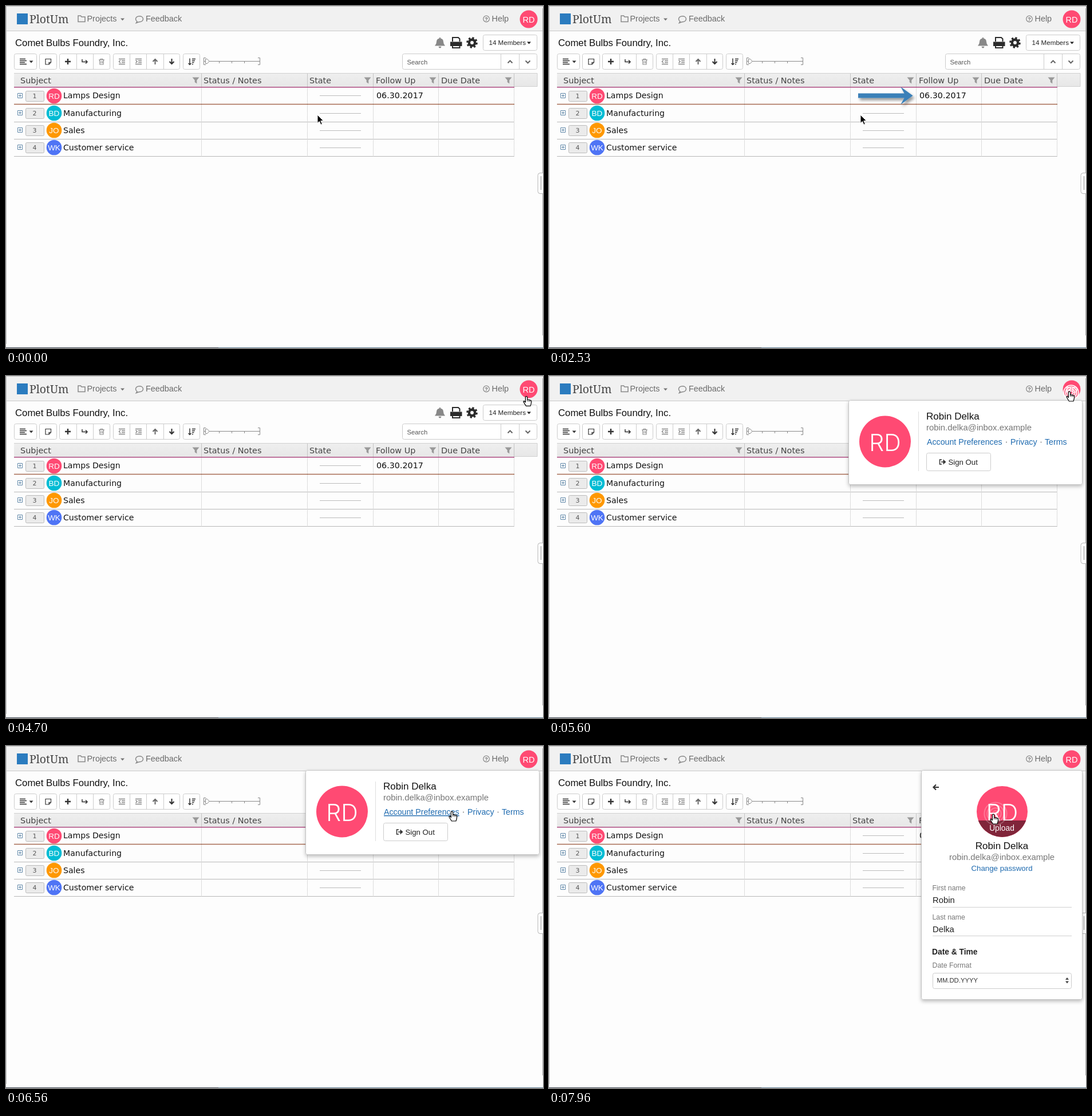
These frames come from a looping animation (938 by 597 pixels, 8000 ms). An HTML page:

```html
<!DOCTYPE html>
<html lang="en">
<head>
<meta charset="utf-8">
<title>Project grid</title>
<style>
  html, body { margin: 0; height: 100%; overflow: hidden; background: #fdfdfd; }
  svg { display: block; width: 100vw; height: 100vh; }
  text { font-family: "Liberation Sans", Arial, sans-serif; white-space: pre; }
  .grid text { font-family: "DejaVu Sans", Verdana, sans-serif; font-size: 14.1px; }
  .grid .initials, .initials { font-family: "Liberation Sans", Arial, sans-serif; fill: #fff; text-anchor: middle; }
  .big { font-family: Inter, sans-serif; font-weight: 300; font-size: 41px; }
  .nav text { font-size: 14.4px; fill: #6b6b6b; }
  .button { fill: #fff; stroke: #ccc; }
  .line { fill: none; stroke: #333; stroke-width: 1.5; }
  .dim { stroke: #888; }
  .link { fill: #1f6bb0; font-size: 14.2px; }
  .name { font-size: 17px; fill: #111; }
  .mail { font-size: 14.9px; fill: #777; }
  .label { font-size: 12.3px; fill: #777; }
  .value { font-size: 14.8px; fill: #222; }
  .card { fill: #fff; stroke: #c4c4c4; filter: url(#cardShadow); }
  .middle { text-anchor: middle; }
</style>
</head>
<body>
<svg viewBox="0 0 938 597" preserveAspectRatio="none">
  <defs>
    <filter id="cardShadow" x="-10%" y="-10%" width="120%" height="125%">
      <feDropShadow dx="0" dy="3" stdDeviation="3" flood-opacity=".25"/>
    </filter>
    <filter id="arrowShadow" x="-20%" y="-30%" width="140%" height="180%">
      <feDropShadow dx="3" dy="4" stdDeviation="2.5" flood-opacity=".4"/>
    </filter>
    <linearGradient id="headFill" x2="0" y2="1">
      <stop stop-color="#efefef"/><stop offset="1" stop-color="#e7e7e7"/>
    </linearGradient>
    <clipPath id="uploadClip"><path d="M740 130h104v40h-104z"/></clipPath>
    <path id="funnel" d="M-6-5H6L1.8 0V6L-1.8 3.5V0Z" fill="#999"/>
    <path id="caret" d="M-3.5-2h7L0 2z"/>
  </defs>

  <rect width="938" height="597" fill="#fdfdfd"/>

  <!-- navigation bar -->
  <g class="nav">
    <rect width="938" height="43" fill="#f1f1f1"/>
    <path d="M0 43.5H938" stroke="#c8c8c8"/>
    <rect x="19" y="13" width="19" height="19" fill="#2b7cbf"/>
    <text x="41" y="29.5" style="font:19.5px 'Noto Serif',serif;fill:#444">PlotUm</text>
    <path class="line dim" stroke-width="1.2" d="M126 27.500V17h4.500l1.500 2h6v8.500z"/>
    <text x="141.500" y="27">Projects</text>
    <use href="#caret" x="203.500" y="23.500" fill="#777"/>
    <path class="line dim" d="M229 27l-1.500 2.500 5-1.800c4 .3 7-1.800 7-5s-3-5-6.500-5-6.500 2-6.500 5c0 2 1 3.300 2.500 4.300z"/>
    <text x="244" y="27">Feedback</text>
    <circle class="line dim" cx="839" cy="22.500" r="5.300" style="stroke-width:1.200"/>
    <text class="middle" x="839" y="26" style="font-size:9px;font-weight:bold">?</text>
    <text x="848.500" y="27">Help</text>
    <circle cx="913" cy="23" r="15.500" fill="#ff4a73"/>
    <text class="initials" x="913" y="28.500" style="fill:#fff;font-size:14.500px">RD</text>
  </g>

  <!-- title row -->
  <text x="16" y="69.500" font-size="16.750" fill="#111">Comet Bulbs Foundry, Inc.</text>
  <path d="M749 69.500q3-3 3-7 0-5 5-6v-1.500h2v1.500q5 1 5 6 0 4 3 7zm6.500 1.300h5q-.5 2.700-2.500 2.700t-2.500-2.700z" fill="#888"/>
  <g fill="none" stroke="#2b2b2b" stroke-width="2">
    <path d="M780 62v-7h10l2.500 2.500V62M780 67v6h12.500v-6"/>
    <path d="M777 69v-5.500h18.500V69z" fill="#2b2b2b"/>
    <circle cx="814" cy="64" r="5.200" stroke-width="4.500"/>
    <circle cx="814" cy="64" r="8.300" stroke-width="3" stroke-dasharray="3.300 3.220"/>
  </g>
  <rect id="members" class="button" x="833.500" y="50.500" width="94" height="27" rx="3"/>
  <text x="843.500" y="68" font-size="11.600" fill="#222">14 Members</text>
  <use href="#caret" x="913.500" y="64.500" fill="#222"/>

  <!-- toolbar -->
  <g id="toolbar"></g>
  <path class="line" d="M24 92.500h10M24 95.500h12M24 98.500h9M24 101.500h12"/>
  <use href="#caret" x="44" y="97.500" fill="#333"/>
  <path class="line" d="M69 92.500h9.500v6l-3.500 3.500h-6zM78.500 98.500h-3.500v3.500" style="stroke-width:1.200"/>
  <path class="line" d="M108 92v10M103 97h10" style="stroke-width:2.400"/>
  <path class="line" d="M133 93v4.500h9M139 94.500l3 3-3 3"/>
  <path class="line dim" d="M163.500 94.500l.5 7.500h6l.5-7.500M162 94h10M165 94v-1.500h4V94M166 96v4M168.500 96v4" style="stroke-width:1.100"/>
  <path class="line dim" d="M197 92.500h11M202 95.500h6M202 98.500h6M197 101.500h11M200 94.500l-2.500 2.500 2.500 2.500"/>
  <path class="line dim" d="M226 92.500h11M231 95.500h6M231 98.500h6M226 101.500h11M226.500 94.500l2.500 2.500-2.500 2.500"/>
  <path class="line" d="M260.500 102v-9M256.500 97l4-4 4 4" style="stroke:#666;stroke-width:2"/>
  <path class="line" d="M289.500 92v9M285.500 97l4 4 4-4" style="stroke-width:2"/>
  <path class="line" d="M321 91.500v11M318.500 100l2.500 2.500 2.500-2.500M325 92.500h6M325 95.500h5M325 98.500h3.500M325 101.500h2"/>
  <path class="line dim" d="M349 90.500h-3.500v12h3.500M440 90.500h3.500v12H440M346 96.500h97M372.500 97v3M394.500 97v3M416.500 97v3" style="stroke-width:1"/>
  <path class="line dim" d="M348.500 92.500h3l3.500 4-3.500 4h-3z" style="fill:#fff;stroke-width:1"/>
  <text x="700.500" y="101.500" font-size="11.300" fill="#555">Search</text>
  <path class="line" d="M876.500 99.500l4-4 4 4M907.500 95.500l4 4 4-4" style="stroke:#666;stroke-width:2"/>

  <!-- grid -->
  <g class="grid" id="grid">
    <rect x="14" y="117" width="914" height="24" fill="url(#headFill)"/>
    <path d="M14 117.500H928V140.500H888" fill="none" stroke="#d0d0d0"/>
  </g>

  <!-- side handle and window edges -->
  <path d="M937.500 4V575" stroke="#aaa"/>
  <path d="M938 291.500h-5q-4 0-4 4v28q0 4 4 4h5" fill="#fff" stroke="#b5b5b5"/>
  <path d="M934.500 297v24" stroke="#888"/>
  <path d="M.5 590V.5H938" fill="none" stroke="#c4c4c4"/>
  <path d="M0 596.500H371" stroke="#3c4650"/>
  <path d="M371 596.500H938" stroke="#5d7b90"/>

  <path id="pointer" d="M540 152.500H621L614.500 141 636 156.500 614.500 172 621 160.500H540Z" fill="#3a80b8" filter="url(#arrowShadow)"/>

  <!-- account popover -->
  <g id="popover">
    <rect class="card" x="523.500" y="42.500" width="408" height="147" rx="3"/>
    <circle cx="587" cy="114.500" r="45" fill="#ff4a73"/>
    <text class="initials big" x="587" y="130.500">RD</text>
    <path d="M645.500 62V166" stroke="#ddd"/>
    <text class="name" x="659" y="76">Robin Delka</text>
    <text class="mail" x="659" y="95">robin.delka@inbox.example</text>
    <text class="link" id="preferences" x="660" y="120">Account Preferences</text>
    <text class="link" x="806" y="120">Privacy</text>
    <text class="link" x="866" y="120">Terms</text>
    <path d="M798 115.500h2M858.500 115.500h2" stroke="#888" stroke-width="1.500"/>
    <rect class="button" x="659.500" y="134.500" width="112" height="31" rx="3"/>
    <path class="line" d="M686 146h-3.500v8h3.500M685 150h5"/>
    <path d="M688.500 145.500l5 4.500-5 4.500z" fill="#333"/>
    <text x="697.500" y="154.500" font-size="13.200" fill="#222">Sign Out</text>
  </g>

  <!-- preferences panel -->
  <g id="panel">
    <rect class="card" x="650.500" y="42.500" width="281" height="400" rx="3"/>
    <path class="line" d="M681 72h-9M676 67.500l-4.500 4.500 4.500 4.500" style="stroke-width:2.200"/>
    <circle cx="791.500" cy="114.500" r="44.500" fill="#ff4a73"/>
    <text class="initials big" x="791.500" y="130.500">RD</text>
    <circle cx="791.500" cy="114.500" r="44.500" fill="#80253a" clip-path="url(#uploadClip)"/>
    <text class="initials" x="791" y="147.500" font-size="13.800">Upload</text>
    <text class="name middle" x="791" y="179.500">Robin Delka</text>
    <text class="mail middle" x="791" y="199">robin.delka@inbox.example</text>
    <text class="link middle" x="791" y="217.500" style="font-size:13.300px">Change password</text>
    <text class="label" x="669.500" y="251.500">First name</text>
    <text class="value" x="670" y="274">Robin</text>
    <text class="label" x="669.500" y="302.500">Last name</text>
    <text class="value" x="670" y="325">Delka</text>
    <path d="M670 281.500H913M670 331.500H913" stroke="#d0d0d0"/>
    <text x="669" y="363.500" font-size="13.800" font-weight="bold" fill="#222">Date &amp; Time</text>
    <text class="label" x="669.500" y="387">Date Format</text>
    <rect class="button" x="670.500" y="396.500" width="242" height="27" rx="3"/>
    <text x="677.500" y="413" font-size="11.300" fill="#333">MM.DD.YYYY</text>
    <path d="M902 408l3-4 3 4zM902 410.500l3 4 3-4z" fill="#444"/>
  </g>

  <g id="ripple" fill="none" stroke="#fff" stroke-width="2"></g>

  <path id="arrowCursor" d="M0 0V14.500L3.400 11.400 6 17.200 8.400 16.200 5.800 10.500H10.500Z" fill="#000" stroke="#fff"/>
  <g id="handCursor" fill="#fff" stroke="#000" stroke-width="1.200" stroke-linejoin="round">
    <path d="M-1.600 10.500V1.800q0-1.600 1.500-1.600t1.700 1.600V6q1-1 2.500.5 1.200-.8 2.400.5 2-.4 2.300 1.700l-.6 4.300-1.200 4H-.6L-4.800 10.200q-.8-2 1-1.900z"/>
    <path d="M1.600 6v3M4.200 7v2.500M6.600 7.500v2" stroke-width=".9"/>
  </g>
</svg>

<script>
const $ = id => document.getElementById(id);
const LOOP = 8000;

// Button groups: left edge, inner dividers, right edge
$('toolbar').innerHTML = [[14, 53], [58, 88], [93, 123, 152, 181], [187, 216, 245, 275, 303],
  [309, 338], [692, 864, 896, 927]].map(edges => {
    const left = edges[0], right = edges.at(-1);
    return `<rect class="button" x="${left + .5}" y="83.5" width="${right - left}" height="27" rx="3"/>` +
      edges.slice(1, -1).map(x => `<path d="M${x + .5} 84V110" stroke="#ccc"/>`).join('');
  }).join('');

const columns = [['Subject', 25, 341], ['Status / Notes', 345, 526], ['State', 530, 641],
  ['Follow Up', 646, 755], ['Due Date', 760, 887]];
const rows = [['RD', '#ff4a73', 'Lamps Design'], ['BD', '#00bcd4', 'Manufacturing'],
  ['JO', '#ff9800', 'Sales'], ['WK', '#4f74f5', 'Customer service']];

const header = columns.map(([title, x, right]) =>
  `<text x="${x}" y="134.5" fill="#444" style="font-size:14.4px">${title}</text>
   <path d="M${right + .5} 118V141" stroke="#c4c4c4"/>
   <path d="M${right + .5} 142V262" stroke="#bbb" stroke-dasharray="1 1"/>` +
  (title[1] === 't' && title.length > 5 ? '' : `<use href="#funnel" x="${right - 9.5}" y="129.5"/>`)).join('');

const body = rows.map(([initials, color, title], i) => {
  const y = 157 + 30 * i;
  return `<path d="M20.5 ${y - 4.5}h8v8h-8zM22 ${y - .5}h5M24.500 ${y - 3}v5" fill="none" stroke="#5f87a8"/>
    <rect x="34.5" y="${y - 8.500}" width="32" height="18" rx="2" fill="#ebebeb" stroke="#bbb"/>
    <text class="middle" x="50" y="${y + 4}" fill="#555" style="font-size:11px">${i + 1}</text>
    <circle cx="84" cy="${y}" r="13.3" fill="${color}"/>
    <text class="initials" x="84" y="${y + 5}" style="font-size:13.5px">${initials}</text>
    <text x="100" y="${y + (i ? 5 : 4)}" fill="#111">${title}</text>
    <path d="M548 ${y + (i ? .5 : -.5)}H620" stroke="#bbb"/>
    ${i ? `<path d="M14 ${y + 15.5}H888" stroke="#b8b8b8"/>` : ''}`;
}).join('');

$('grid').innerHTML += header + body +
  `<text x="647" y="161" fill="#111" style="font-size:14.3px">06.30.2017</text>
   <path d="M14 141.700H888" stroke="#ad4a80" stroke-width="1.500"/>
   <path d="M14 171.500H888" stroke="#a5694f" stroke-width="1.500"/>`;

const RINGS = 4;
$('ripple').innerHTML = '<circle/>'.repeat(RINGS);

const ease = (t, start, end) => {
  const p = Math.min(1, Math.max(0, (t - start) / (end - start)));
  return (1 - Math.cos(Math.PI * p)) / 2;
};
const show = (id, on) => $(id).style.display = on ? '' : 'none';
const place = (id, x, y) => $(id).setAttribute('transform', `translate(${x} ${y})`);

// Damped spring from 0 to 1; s in seconds
const spring = s => s <= 0 ? 0 : 1 - Math.exp(-5.1 * s) * Math.cos(7.9 * s);

function drawPointer(t) {
  const stretch = t < 1800 ? spring((t - 60) / 1000) : spring((3460 - t) / 1000);
  show('pointer', t >= 100 && stretch > .01);
  $('pointer').setAttribute('transform', `translate(${540 * (1 - stretch)} 0) scale(${stretch} 1)`);
}

function drawRipple(t) {
  const [start, x, y] = t < 7000 ? [5130, 912, 29] : [7100, 780, 118];
  const p = (t - start) / 950;
  show('ripple', p >= 0 && p < 1);
  if (p < 0 || p >= 1) return;
  place('ripple', x, y);
  $('ripple').setAttribute('opacity', Math.min(.9, 2.6 * (1 - p)));
  [...$('ripple').children].forEach((ring, i) =>
    ring.setAttribute('r', 21 * p ** .7 * (i + 1) / RINGS));
}

function draw(t) {
  const popover = t >= 5260 && t < 7230, panel = t >= 7230;
  const toLink = ease(t, 5900, 6560), drift = ease(t, 7300, 7650);
  const x = 544 + 365 * ease(t, 3770, 4670) - 130 * toLink - 3 * drift;
  const y = 190 - 163 * ease(t, 3770, 4860) + 87 * toLink + 5 * drift;

  const onAvatar = Math.hypot(x - 913, y - 23) < 16;
  const onLink = popover && x > 660 && x < 792 && y > 105 && y < 124;
  const onMembers = !popover && !panel && x > 833 && x < 928 && y > 50 && y < 78;
  const hand = onAvatar || onLink || panel;

  drawPointer(t);
  show('popover', popover);
  show('panel', panel);
  $('preferences').style.textDecoration = onLink ? 'underline' : 'none';
  $('members').style.fill = onMembers ? '#e6e6e6' : '';
  $('members').style.stroke = onMembers ? '#adadad' : '';
  drawRipple(t);
  show('handCursor', hand);
  show('arrowCursor', !hand);
  place(hand ? 'handCursor' : 'arrowCursor', x, y);
}

const origin = performance.now();
function tick() {
  draw((performance.now() - origin) % LOOP);
  requestAnimationFrame(tick);
}
tick();
</script>
</body>
</html>
```
